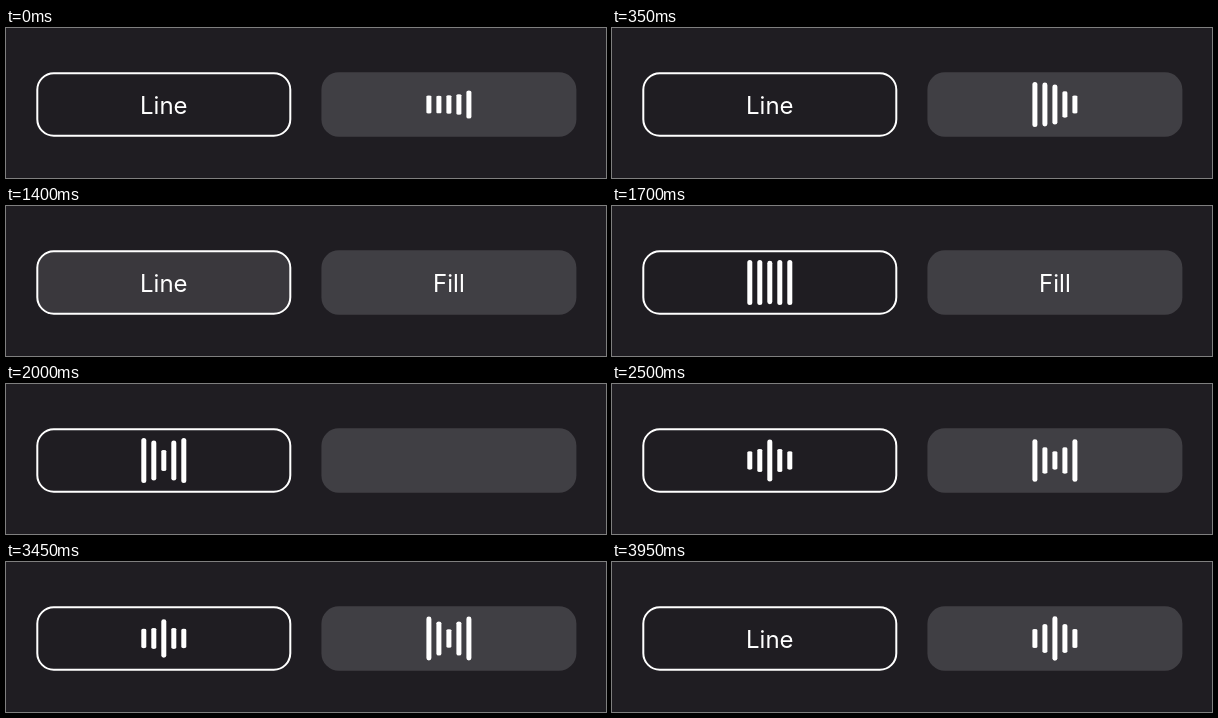
Animation, 600 px wide and 150 px high, one loop 4 s. Source, as an HTML page:

```html
<!DOCTYPE html>
<html lang="en">
<head>
<meta charset="utf-8">
<title>Loading buttons</title>
<style>
  html, body { margin: 0; width: 100%; height: 100%; overflow: hidden; background: #1f1d22; }
  svg { display: block; width: 100%; height: 100%; }
  text { font: 400 24px Inter, Roboto, sans-serif; fill: #fff; text-anchor: middle; }
</style>
</head>
<body>
<svg id="stage" viewBox="0 0 600 150">
  <rect width="600" height="150" fill="#1f1d22"/>
</svg>
<script>
const LOOP = 4000, BARS = 5, BAR_W = 5, BAR_H = 45, MID_Y = 76.5;
const stage = document.getElementById('stage');

function add(tag, attrs) {
  const el = document.createElementNS('http://www.w3.org/2000/svg', tag);
  for (const k in attrs) el.setAttribute(k, attrs[k]);
  return stage.appendChild(el);
}

function bezier(x1, y1, x2, y2) {
  const at = (a, b, s) => 3 * a * s * (1 - s) ** 2 + 3 * b * s * s * (1 - s) + s ** 3;
  return x => {
    let lo = 0, hi = 1;
    for (let i = 0; i < 24; i++) {
      const m = (lo + hi) / 2;
      if (at(x1, x2, m) < x) lo = m; else hi = m;
    }
    return at(y1, y2, lo);
  };
}

const clamp = v => Math.min(1, Math.max(0, v));
const easeOut = bezier(0, 0, 0.58, 1);
const fade = (t, start, length) => easeOut(clamp((t - start) / length));

// One-second cycle: shrink to 40 %, then grow back.
function cycle(ms, ease) {
  if (ms < 0) return 1;
  const p = ms / 500 % 2;
  return p < 1 ? 1 - 0.6 * ease(p) : 0.4 + 0.6 * ease(p - 1);
}

const pulseEase = bezier(0.85, 0.25, 0.37, 0.85);
const waveEase = bezier(0.2, 0.68, 0.18, 1.08);
const pulse = (ms, i) => cycle(ms - 200 * Math.abs(i - 2), pulseEase);
const wave = (ms, i) => cycle(ms - 100 * i, waveEase);

function makeButton(cx, label, look, glow) {
  const box = { x: cx - 127.5, y: 44.25, width: 255, height: 64.5, rx: 17.5 };
  if (look.stroke) {
    Object.assign(box, { x: box.x + 1, y: box.y + 1, width: 253, height: 62.5, rx: 16.5 });
  }
  add('rect', { ...box, ...look });
  const shade = add('rect', { ...box, fill: glow, opacity: 0 });
  const text = add('text', { x: cx, y: 85.5 });
  text.textContent = label;
  const bars = Array.from({ length: BARS }, (_, i) => add('rect', {
    x: cx + (i - 2) * 10 - BAR_W / 2, width: BAR_W, rx: BAR_W / 2, fill: '#fff'
  }));
  return { shade, text, bars };
}

const line = makeButton(157.8, 'Line', { fill: 'none', stroke: '#fff', 'stroke-width': 2 }, '#fff');
const fill = makeButton(442.9, 'Fill', { fill: '#403f44' }, '#1f1d22');

function draw(btn, textAlpha, press, scale) {
  btn.text.setAttribute('opacity', textAlpha);
  btn.shade.setAttribute('opacity', press);
  btn.bars.forEach((bar, i) => {
    bar.setAttribute('visibility', scale ? 'visible' : 'hidden');
    if (!scale) return;
    const s = scale(i);
    bar.setAttribute('y', MID_Y - BAR_H * s / 2);
    bar.setAttribute('height', BAR_H * s);
    bar.setAttribute('ry', BAR_W / 2 * s);
  });
}

const tap = (t, start) => t >= start && t < start + 120 ? 0.12 : 0;

function render(t) {
  const lineText = t < 3640 ? 1 - fade(t, 1420, 200) : fade(t, 3640, 200);
  const lineBars = t >= 1640 && t < 3640 && (i => pulse(t - 1620, i));
  draw(line, lineText, tap(t, 1390), lineBars);

  const fillText = t < 1785 ? fade(t, 470, 180) : 1 - fade(t, 1785, 200);
  const fillBars = t < 470 ? i => wave(t + 492, i)
    : t >= 2010 && (i => pulse(t - 1985, i));
  draw(fill, fillText, tap(t, 1755), fillBars);
}

const start = performance.now();
function tick() {
  render((performance.now() - start) % LOOP);
  requestAnimationFrame(tick);
}
tick();
</script>
</body>
</html>
```
